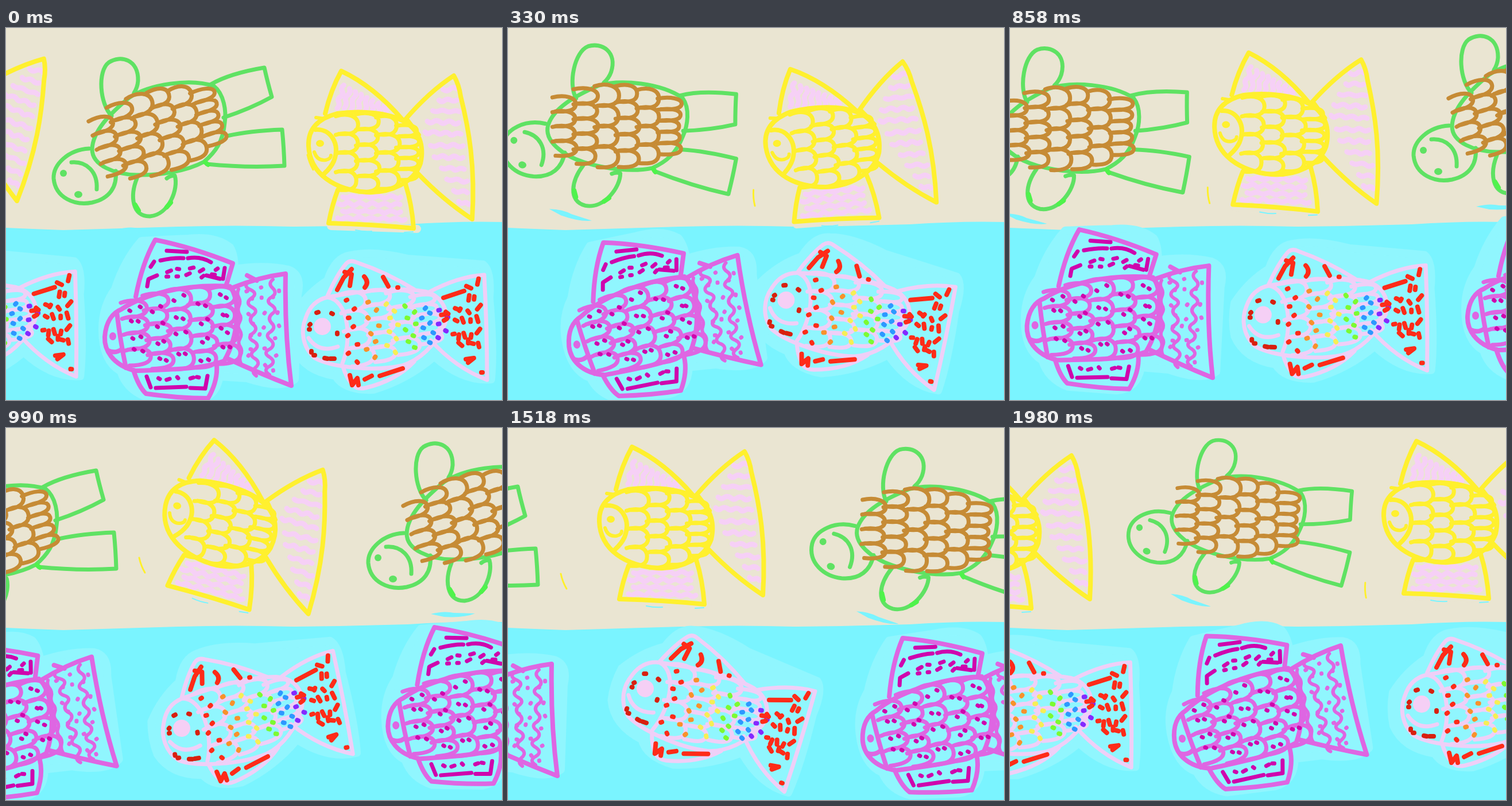
These frames come from a looping animation (864 by 648 pixels, 2.31 s). An HTML page with a canvas:

```html
<!DOCTYPE html>
<html lang="en">
<head>
<meta charset="utf-8">
<title>Swimming fish and turtle</title>
<style>
html, body { margin: 0; width: 100%; height: 100%; overflow: hidden; background: #eae5d2; }
canvas { display: block; }
</style>
</head>
<body>
<canvas id="stage" width="864" height="648"></canvas>
<script>
const ctx = document.getElementById('stage').getContext('2d');
const SAND = '#eae5d2', WATER = '#7af4ff', HALO = '#90f6fe';
const STEP = 330, COUNT = 7, RAD = Math.PI / 180;

let seed;
const rand = () => { const v = Math.sin(++seed * 91.7) * 4375.85; return v - Math.floor(v); };
const jitter = size => (rand() - .5) * 2 * size;
const mix = (a, b, t) => a + (b - a) * t;

function line(color, width, d) {
  ctx.strokeStyle = color;
  ctx.lineWidth = width;
  ctx.stroke(new Path2D(d));
}

function fill(color, d) {
  ctx.fillStyle = color;
  ctx.fill(new Path2D(d));
}

function blob(color, x, y, rx, ry = rx) {
  ctx.fillStyle = color;
  ctx.beginPath();
  ctx.ellipse(x, y, rx, ry, 0, 0, 7);
  ctx.fill();
}

function halo(d) {
  fill(HALO, d);
  line(HALO, 14, d);
}

// One crayon dab; lean in degrees
function dab(color, width, x, y, length, lean) {
  const dx = Math.cos(lean * RAD) * length, dy = Math.sin(lean * RAD) * length;
  line(color, width, `M${x - dx / 2} ${y - dy / 2}l${dx} ${dy}`);
}

// Point inside a quad given as corners a, b, c, d: u runs a to b, v runs a to d
function inQuad([ax, ay, bx, by, cx, cy, dx, dy], u, v) {
  return [mix(mix(ax, bx, u), mix(dx, cx, u), v), mix(mix(ay, by, u), mix(dy, cy, u), v)];
}

function scatter(color, width, quad, cols, rows, length, lean, spread) {
  for (let r = 0; r < rows; r++)
    for (let c = 0; c < cols; c++) {
      const [x, y] = inQuad(quad, (c + .5 + jitter(.3)) / cols, (r + .5 + jitter(.3)) / rows);
      dab(color, width, x, y, length * (.5 + rand()), lean + jitter(spread));
    }
}

function wave(color, width, [x1, y1], [x2, y2], amp, bend) {
  const len = Math.hypot(x2 - x1, y2 - y1), n = Math.max(2, Math.round(len / bend));
  const ux = (x2 - x1) / n, uy = (y2 - y1) / n;
  const nx = -(y2 - y1) / len, ny = (x2 - x1) / len;
  let d = `M${x1} ${y1}`;
  for (let i = 0; i < n; i++) {
    const s = (i % 2 ? -2 : 2) * amp * (.6 + rand() * .7);
    d += `q${ux / 2 + nx * s} ${uy / 2 + ny * s} ${ux} ${uy}`;
  }
  line(color, width, d);
}

function hatch(color, quad, rows) {
  for (let r = 0; r < rows; r++) {
    const v = (r + .5) / rows;
    wave(color, 9, inQuad(quad, rand() * .1, v), inQuad(quad, 1 - rand() * .1, v), 2, 11);
  }
}

// Staggered columns of rounded scales filling part of an ellipse
function scales(color, { x, y, tilt = 0, rx, ry, from, to, cols, rows }, each) {
  const w = (to - from) / cols;
  let d = '';
  ctx.save();
  ctx.translate(x, y);
  ctx.rotate(tilt * RAD);
  for (let k = 0; k < cols; k++) {
    const right = from + w * (k + 1);
    const half = ry * Math.sqrt(1 - ((right - w / 2) / rx) ** 2);
    const n = rows + k % 2, h = 2 * half / n;
    for (let i = 0; i < n; i++) {
      const tip = right + jitter(3), mid = h * (i + .5) - half;
      d += `M${right - w * 1.1} ${mid - h * .45}C${right - w * .5} ${mid - h * .65} ${tip} ${mid - h * .45} ${tip} ${mid}` +
        `S${right - w * .4} ${mid + h * .55} ${right - w * .95} ${mid + h * .5}`;
    }
  }
  line(color, 7, d);
  if (each)
    for (let k = 0; k < cols; k++)
      for (let i = 0; i < rows; i++) {
        const px = from + w * (k + .5), half = ry * Math.sqrt(1 - (px / rx) ** 2);
        each(px, half * (2 * (i + .5 + k % 2 * .4) / (rows + .4) - 1));
      }
  ctx.restore();
}

function turtle() {
  const green = '#5fe263', bright = '#4ff34b';
  fill(WATER, 'M192 351Q215 345 232 349L269 350Q250 358 215 356Z');
  line('#fff02a', 3, 'M525 221Q528 235 535 247');
  line(green, 7, 'M184 153C163 132 159 75 179 60C200 46 231 55 230 92Q229 104 223 113' +
    'M150 211C151 180 180 150 215 121C250 98 320 87 362 101C380 115 384 145 381 165' +
    'C378 198 365 216 345 233C315 249 270 257 228 256C190 255 150 240 150 211');
  line(green, 7, 'M145 210C108 212 82 238 83 262C86 296 120 310 150 304C181 297 194 276 191 249' +
    'M114 234C140 232 160 250 158 281');
  line(green, 7, 'M357 98Q390 79 450 69Q455 92 463 120Q425 141 379 156' +
    'M385 188Q425 179 481 177Q484 207 485 240Q420 244 350 237' +
    'M228 262C216 292 219 329 251 328C284 325 301 280 294 257Q286 257 280 262');
  line(bright, 8, 'M225 308L231 318M280 312L287 304M347 234L352 238');
  blob(green, 100, 253, 6);
  blob(green, 126, 290, 7, 6);
  scales('#c68b35', { x: 265, y: 180, tilt: -16, rx: 128, ry: 72, from: -108, to: 112, cols: 6, rows: 4 });
}

function yellowFish() {
  const yellow = '#fff02e', pink = '#f6d0f6';
  line(SAND, 14, 'M566 345L716 350');
  line(WATER, 2, 'M609 352Q623 355 637 354M694 356L709 355');
  hatch(pink, [570, 142, 584, 95, 664, 138, 668, 148], 8);
  hatch(pink, [766, 98, 785, 96, 797, 195, 720, 190], 5);
  hatch(pink, [728, 195, 798, 195, 808, 318, 794, 312], 6);
  hatch(pink, [582, 288, 692, 288, 702, 340, 574, 337], 4);
  line(yellow, 8, 'M556 149Q566 107 584 75Q640 101 691 160' +
    'M527 205C526 177 542 158 577 149C620 143 666 148 692 162C720 177 729 205 722 236' +
    'C711 268 671 288 628 286C574 282 529 255 527 205');
  line(yellow, 8, 'M695 160Q737 111 780 83Q789 98 792 119C806 175 818 240 812 333Q762 300 718 254' +
    'M578 282Q568 308 562 340Q640 342 710 349Q707 307 696 272' +
    'M539 177C565 175 583 201 571 232Q566 243 555 253');
  line(yellow, 6, 'M537 216Q542 232 557 230Q566 228 566 222M540 156L554 158M700 160L720 186');
  blob(yellow, 547, 201, 7, 6);
  scales(yellow, { x: 626, y: 217, rx: 104, ry: 68, from: -48, to: 92, cols: 4, rows: 4 });
}

function purpleFish() {
  const purple = '#de66e2', magenta = '#cf05ad';
  halo('M236 371Q270 369 318 367Q365 362 390 382Q398 395 398 420Q450 412 492 421Q516 430 508 465' +
    'L503 612Q480 630 420 610L372 607Q365 645 330 648L245 643Q210 630 200 598' +
    'Q168 580 168 525Q168 485 190 455Q206 405 236 371Z');
  line(purple, 8, 'M226 468Q237 410 260 369Q325 382 395 410L383 450' +
    'M201 490C238 465 309 445 390 450C409 474 406 535 380 580C339 595 284 595 225 597' +
    'C185 587 171 560 172 538C174 511 186 496 201 490');
  line(purple, 8, 'M393 453Q440 434 487 428Q485 530 497 623Q440 601 384 575' +
    'M222 596Q231 625 244 637Q300 645 352 645Q369 615 367 588' +
    'M193 495Q199 545 209 592M420 431L437 440M178 562Q191 568 202 559');
  wave(purple, 6, [405, 455], [409, 584], 2, 15);
  wave(purple, 6, [425, 441], [436, 606], 6, 15);
  wave(purple, 6, [465, 438], [459, 604], 6, 15);
  scatter(purple, 7, [412, 445, 482, 438, 484, 612, 412, 580], 3, 7, 1, 0, 90);
  blob(purple, 186, 537, 6, 7);
  scales(purple, { x: 330, y: 522, tilt: -5, rx: 170, ry: 70, from: -122, to: 72, cols: 5, rows: 4 },
    (x, y) => [-6, 6].forEach(side => dab(magenta, 7, x + side + jitter(4), y + jitter(5), 2, 40)));
  line(magenta, 7, 'M280 388L315 390M269 405Q292 400 309 401M317 401Q339 397 357 408' +
    'M258 407L252 416M248 438L246 450M249 437L263 431M349 431L373 437M381 418L378 437' +
    'M245 607L252 626M261 627L314 625M321 627L347 628L351 606');
  scatter(magenta, 7, [270, 418, 372, 414, 374, 434, 265, 440], 5, 2, 5, -15, 25);
  scatter(magenta, 7, [262, 606, 345, 604, 345, 614, 262, 614], 5, 1, 4, 20, 40);
}

function rainbowFish() {
  const pale = '#efcff7', red = '#ff2b18', dark = '#d8200f';
  const bands = [red, '#f8912b', '#f6ee55', '#7cfa31', '#2d98ff', '#8429ff'];
  halo('M501 500Q525 462 560 440Q573 400 600 396Q640 387 700 402L831 412' +
    'Q846 424 842 470Q850 560 845 612Q795 616 746 572Q700 612 640 630' +
    'Q590 632 574 606Q520 598 502 558Q496 530 501 500Z');
  line(pale, 7, 'M560 467Q576 430 592 411Q599 403 610 408Q664 426 712 456' +
    'M560 469C620 458 681 450 730 459C759 466 773 493 764 517C748 553 720 579 690 588' +
    'C641 599 567 591 538 575C516 556 513 527 522 505C529 484 542 473 560 469');
  line(pale, 7, 'M735 461Q787 433 833 430Q838 520 838 613Q783 592 740 544' +
    'M587 590Q592 608 604 622Q612 630 626 627Q680 614 711 581' +
    'M560 469C597 474 603 543 586 584M527 540Q545 567 578 555');
  scales(pale, { x: 610, y: 524, tilt: -8, rx: 168, ry: 64, from: -18, to: 146, cols: 4, rows: 4 });
  blob('#f5cff5', 551, 520, 15);
  line(dark, 8, 'M541 496l3 -1M567 497l2 1M529 517l1 -1M528 525h1M577 531v2M532 563v2M536 570h2M555 575l5 1M565 576h7');
  bands.forEach((color, k) => {
    const x = 602 + k * 38 - k * k * 1.2, half = 54 - k * 6, n = k < 5 ? 8 : 5;
    for (let i = 0; i < n; i++)
      dab(color, 8, x + (i % 2 ? 7 : -7) + jitter(4), 528 - k * 2.5 + half * (2 * i / (n - 1) - 1), 2, jitter(60));
  });
  line(red, 8, 'M762 470L798 458M577 456L588 435L602 420M590 425L602 429L599 449' +
    'M624 433Q633 443 625 452M599 605L603 622L612 610L614 622M625 612L637 606M651 606L691 593' +
    'M801 577L815 575L805 583M657 434L666 450M682 452h1M828 600h2');
  scatter(red, 8, [800, 440, 826, 434, 828, 476, 795, 476], 2, 2, 7, 70, 50);
  scatter(red, 8, [772, 482, 828, 480, 826, 562, 792, 562], 4, 4, 7, 60, 70);
  scatter(red, 8, [747, 475, 770, 490, 788, 545, 764, 520], 1, 4, 4, 0, 60);
}

// Each path holds x, y, angle and size per step, from step `first` on
const cast = [
  { draw: rainbowFish, pivot: [650, 510], first: -1, path: [
    [816, 471], [650, 510], [583, 487, 13.3], [540, 491, .8], [402, 497, -9.4],
    [336, 476, 18.6], [208, 488], [25, 485, 1], [-64, 501, 1]] },
  { draw: purpleFish, pivot: [310, 510], first: -5, path: [
    [935, 474], [802, 486, -2.3], [752, 501, -6], [582, 486], [417, 492, -10.5],
    [310, 510], [238, 505, -9.2], [168, 493, 1], [-11, 510, -10], [-101, 493]] },
  { draw: turtle, pivot: [265, 180], first: -5, path: [
    [885, 140], [813, 153], [728, 178, 17.5], [593, 165], [396, 156, 18, .95],
    [265, 180], [189, 171, 16], [102, 175, 14], [-28, 185], [-168, 213]] },
  { draw: yellowFish, pivot: [630, 210], first: -1, path: [
    [754, 158], [630, 210], [552, 201, -6.2], [459, 179, 1.2], [377, 163, 13],
    [262, 168], [164, 176], [-43, 175], [-116, 128, 18]] }
];

function place({ draw, pivot }, [x, y, angle = 0, size = 1]) {
  seed = 5;
  ctx.save();
  ctx.translate(x, y);
  ctx.rotate(angle * RAD);
  ctx.scale(size, size);
  ctx.translate(-pivot[0], -pivot[1]);
  draw();
  ctx.restore();
}

function render(step) {
  ctx.lineCap = ctx.lineJoin = 'round';
  ctx.fillStyle = SAND;
  ctx.fillRect(0, 0, 864, 648);
  fill(WATER, 'M0 348Q45 350 100 352Q200 349 300 346Q400 343 500 346Q600 345 700 342Q790 336 864 338V648H0Z');
  // A swim lasts longer than the loop, so neighbouring laps overlap
  for (const actor of cast)
    for (const lap of [-COUNT, 0, COUNT]) {
      const pose = actor.path[step + lap - actor.first];
      if (pose) place(actor, pose);
    }
}

let shown = -1;
function tick() {
  const step = Math.floor(performance.now() / STEP) % COUNT;
  if (step !== shown) render(shown = step);
  requestAnimationFrame(tick);
}
tick();
</script>
</body>
</html>
```
